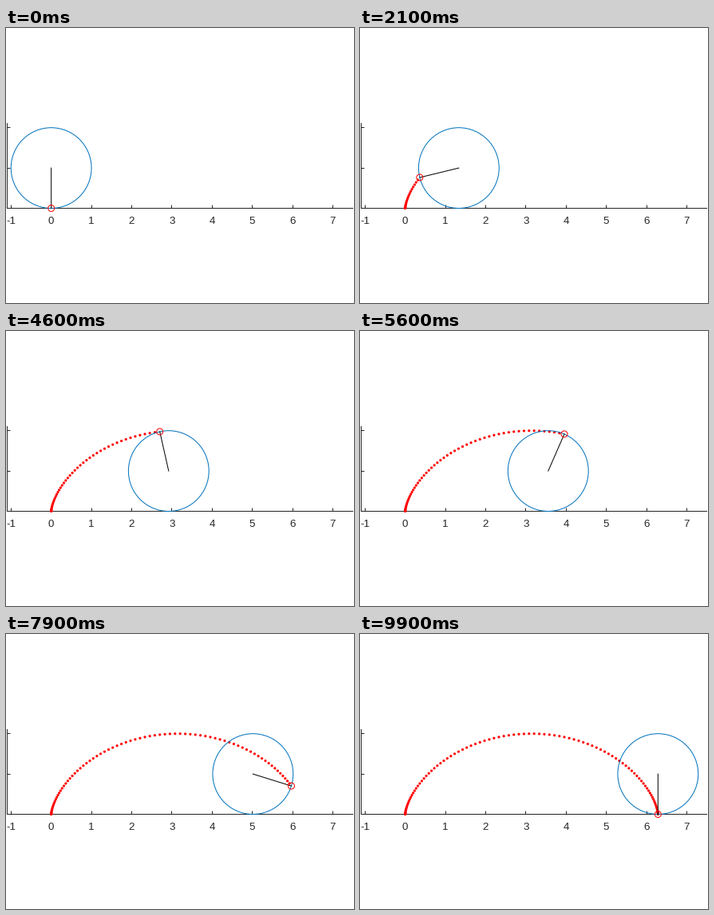
These frames come from a looping animation (436 px wide and 344 px high, 10 s). A matplotlib script:

```python
import numpy as np
import matplotlib.pyplot as plt
from matplotlib.animation import FuncAnimation
from matplotlib.patches import Circle
from matplotlib.transforms import Affine2D

W, H, DPI = 436, 344, 64
PX = 72 / DPI              # one pixel in points
UNIT = 50.4                # pixels per data unit
X0, Y0 = 56.15, 119        # pixel position of the data origin, from bottom left
XMIN, XMAX, YMAX = -1.1, 7.5, 2.1
STEPS = 100
INK = "#262626"

plt.rcParams["font.family"] = "Liberation Sans"

fig = plt.figure(figsize=(W / DPI, H / DPI), dpi=DPI, facecolor="white")
ax = fig.add_axes([(X0 + XMIN * UNIT) / W, Y0 / H,
                   (XMAX - XMIN) * UNIT / W, YMAX * UNIT / H])
ax.set(xlim=(XMIN, XMAX), ylim=(0, YMAX),
       xticks=range(-1, 8), yticks=[0, 1, 2])
ax.patch.set_visible(False)
ax.spines[["top", "right"]].set_visible(False)
for side in ("left", "bottom"):
    ax.spines[side].set(color=INK, linewidth=PX)
ax.tick_params(direction="in", length=4.3 * PX, width=PX, color=INK,
               labelbottom=False, labelleft=False)

# Axis lines snap to whole pixels; the artists sit on pixel centres.
centred = ax.transData + Affine2D().translate(0.5, -0.5)
style = dict(transform=centred, clip_on=False)

for n in range(-1, 8):
    ax.text(n, -19.5 / UNIT, str(n), ha="center", va="baseline",
            fontsize=13.33 * PX, color=INK, transform=centred)


def ring(radius, color, z):
    return ax.add_patch(Circle((0, 0), radius, fill=False, ec=color, lw=PX,
                               zorder=z, **style))


def dot(x, y):
    return ax.add_patch(Circle((x, y), 1.6 / UNIT, fc="red", lw=0,
                               zorder=3, **style))


theta = np.linspace(0, 2 * np.pi, STEPS)
px, py = theta - np.sin(theta), 1 - np.cos(theta)

trail = [dot(x, y) for x, y in zip(px, py)]
wheel = ring(1, "#0072BD", 4)
spoke = ax.plot([], [], color="black", lw=PX, snap=False, zorder=5, **style)[0]
pen = ring(4 / UNIT, "red", 6)


def draw(i):
    for k, d in enumerate(trail):
        d.set_visible(k < i)
    wheel.center = theta[i], 1
    spoke.set_data([theta[i], px[i]], [1, py[i]])
    pen.center = px[i], py[i]
    return [*trail, wheel, spoke, pen]


anim = FuncAnimation(fig, draw, frames=STEPS, init_func=lambda: draw(0),
                     interval=100, repeat=True, repeat_delay=0, blit=False)
plt.show()
```
